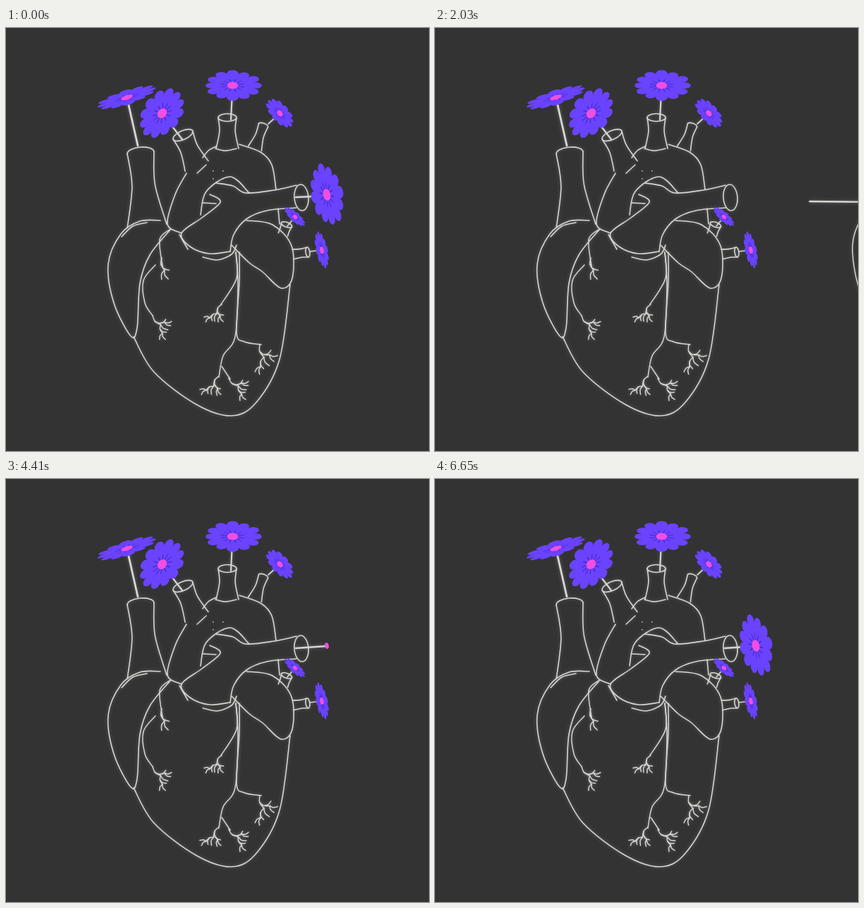
An HTML page with a canvas for the animation above (6.72 s loop, 600 by 600 pixels).

```html
<!DOCTYPE html>
<html lang="en">
<head>
<meta charset="utf-8">
<title>Heart in bloom</title>
<style>
html, body { margin: 0; width: 100%; height: 100%; overflow: hidden; background: #333; }
canvas { display: block; width: 600px; height: 600px; }
</style>
</head>
<body>
<canvas id="stage" width="600" height="600"></canvas>
<script>
const LOOP = 6720, STEP = 70;
const BG = '#333333', INK = '#d6d6d3', PETAL = '#6a43ff', VEIN = '#3d22b4', PINK = '#f04fe0';
const ctx = document.getElementById('stage').getContext('2d');

const clamp = v => Math.max(0, Math.min(1, v));
const mix = (a, b, k) => a + (b - a) * k;
const rad = deg => deg * Math.PI / 180;
const noise = n => { const v = Math.sin(n * 12.9898) * 43758.5453; return v - Math.floor(v); };
const parse = s => s.trim().split(/\s+/).map(p => p.split(',').map(Number));

// Smooth curve through a few key points
function trace(g, pts, joined) {
  if (!joined) g.moveTo(...pts[0]);
  for (let i = 0; i < pts.length - 1; i++) {
    const a = pts[i - 1] || pts[i], b = pts[i], c = pts[i + 1], d = pts[i + 2] || c;
    g.bezierCurveTo(
      b[0] + (c[0] - a[0]) / 6, b[1] + (c[1] - a[1]) / 6,
      c[0] - (d[0] - b[0]) / 6, c[1] - (d[1] - b[1]) / 6, c[0], c[1]);
  }
}

function ink(g, width, draw) {
  g.save();
  g.strokeStyle = INK;
  g.lineWidth = width;
  g.lineCap = g.lineJoin = 'round';
  g.shadowColor = 'rgba(255,255,255,.3)';
  g.shadowBlur = 5;
  g.beginPath();
  draw();
  g.stroke();
  g.restore();
}
const curve = (g, pts, width = 1.6) => ink(g, width, () => trace(g, pts));
const curves = (g, text, width) =>
  text.trim().split('\n').forEach(row => curve(g, parse(row), width));

// A vessel: mouth of radius r, walls that narrow and flare out to the base
function tube(g, x, y, deg, r, len, base, open = true) {
  const mouth = r * 0.42;
  g.save();
  g.translate(x, y);
  g.rotate(rad(deg - 90));
  ink(g, 1.6, () => g.ellipse(0, 0, r, mouth, 0, Math.PI, open ? 3 * Math.PI : 2 * Math.PI));
  for (const s of [-1, 1]) curve(g, [[s * r, 0], [s * r * 0.86, len * 0.45], [s * base, len]]);
  g.restore();
}

// A vein that keeps splitting in two
function fork(g, x, y, deg, size, depth) {
  const a = rad(deg), bend = rad(deg + 20);
  const mid = [x + size * 0.5 * Math.cos(bend), y + size * 0.5 * Math.sin(bend)];
  const end = [x + size * Math.cos(a), y + size * Math.sin(a)];
  curve(g, [[x, y], mid, end], 1.5);
  if (!depth) return;
  const spread = 24 + 14 * noise(x + y);
  fork(g, ...mid, deg - spread * 1.4, size * 0.8, depth - 1);
  fork(g, ...end, deg + spread, size * 0.75, depth - 1);
  fork(g, ...end, deg - spread * 0.4, size * 0.75, 0);
}

function flower(g, x, y, deg, major, minor, grow = 1, core = 1) {
  const n = 12;
  g.save();
  g.translate(x, y);
  g.rotate(rad(deg));
  g.save();
  g.scale(major, minor);
  g.fillStyle = PETAL;
  for (let i = 0; i < n && grow > 0; i++) {
    const a = i / n * 2 * Math.PI;
    const full = 0.94 + 0.1 * noise(i + x);
    const len = Math.min(full, grow * (1.12 + 0.35 * Math.max(0, Math.cos(a)) ** 4));
    const w = len * 0.2;
    g.save();
    g.rotate(a);
    g.beginPath();
    g.moveTo(0, 0);
    g.bezierCurveTo(len * 0.35, -w * 0.7, len * 0.55, -w, len * 0.8, -w);
    g.bezierCurveTo(len * 1.06, -w * 0.8, len * 1.06, w * 0.8, len * 0.8, w);
    g.bezierCurveTo(len * 0.55, w, len * 0.35, w * 0.7, 0, 0);
    g.fill();
    g.restore();
  }
  g.strokeStyle = VEIN;
  g.lineWidth = 0.03;
  for (let i = 0; i < n && grow > 0.3; i++) {
    const a = (i + 0.5) / n * 2 * Math.PI, r = grow * 0.42;
    g.beginPath();
    g.moveTo(0, 0);
    g.lineTo(r * Math.cos(a), r * Math.sin(a));
    g.stroke();
  }
  g.restore();
  g.fillStyle = PINK;
  g.beginPath();
  g.ellipse(0, 0, major * 0.19 * core, (minor * 0.18 + 1.2) * core, 0, 0, 7);
  g.fill();
  g.restore();
}

function planted(g, x, y, deg, major, minor, footX, footY, width) {
  curve(g, [[x, y], [footX, footY]], width);
  flower(g, x, y, deg, major, minor);
}

function drawHeart(g) {
  // Vessels
  tube(g, 191, 177, 85, 19, 104, 28, false);
  tube(g, 251, 152, 66, 15, 48, 18);
  tube(g, 314, 127, 90, 13, 44, 16);
  tube(g, 365, 138, 110, 7, 35, 10, false);
  tube(g, 398, 279, 110, 8, 15, 7);
  tube(g, 428, 318, 172, 7, 21, 7);
  ink(g, 1.6, () => g.ellipse(419, 240.5, 10, 18.5, -0.08, 0, 7));
  // Chambers, aorta, trunk, body
  curves(g, `
219,273 190,274 163,292 145,335 153,390 177,437 186,425 190,362 204,322 234,285
164,296 180,281 200,276
256,206 240,236 229,278 249,291
271,206 284,194
279,184 287,174 298,168
297,171 311,174 327,171
331,165 361,176 377,194 383,229
276,265 284,232 318,211 345,234
298,220 322,224 340,234 380,230 412,223
279,248 298,249
289,236 304,247 278,269 249,291 261,310 288,320 318,317
412,255 370,259 341,271 323,293 318,317
246,293 258,314
279,325 300,329 320,321 327,308
341,273 378,279 405,309 406,355 390,369 364,346 345,333 320,308
386,256 388,278
181,438 210,488 270,534 320,550 355,531 388,470 403,364`);
  g.fillStyle = INK;
  for (let i = 0; i < 4; i++) g.fillRect(293 + 14 * (i % 2), 202 + 11 * (i >> 1), 1.5, 1.5);
  // Veins
  curves(g, `
232,286 218,300 222,338
212,336 195,358 197,390 208,408
326,318 327,355 305,392
331,318 331,360 327,432 338,445 362,449
326,318 329,365 325,438 308,465 302,495
306,480 318,498`, 1.5);
  fork(g, 221, 326, 78, 18, 1);
  fork(g, 208, 408, 48, 17, 2);
  fork(g, 306, 392, 118, 15, 2);
  fork(g, 360, 449, 72, 19, 2);
  fork(g, 302, 494, 118, 16, 2);
  fork(g, 316, 497, 38, 17, 2);
  // Flowers
  planted(g, 171.5, 98.5, -18, 45, 10.5, 187, 167, 2.8);
  planted(g, 221.5, 121, -50, 40, 27, 250, 158, 2.2);
  planted(g, 321.5, 81.5, 0, 41, 21.5, 319, 130, 2.2);
  planted(g, 388.5, 121, 48, 26, 13, 372, 136, 1.7);
  planted(g, 410, 268, 42, 19, 7, 399, 281, 1.7);
  planted(g, 448, 315, 78, 27, 8.5, 431, 317, 1.7);
}

// Rim of the hand, from the left side of the arm round to the right
const RIM = [
  '495,600 485,520 472,432 436,383 411,322 404,290 415,275',
  '415,275 434,296 446,345',
  '446,345 466,300 455,258 425,214',
  '425,214 440,217 455,208 496,222 531,263 556,335',
  '556,335 545,400 550,455 578,600'].map(parse);
const FINGERS = ['440,217 476,236 498,298', '455,214 510,251 537,320'].map(parse);

// Bends the reaching hand into the pinching one: arm upright, thumb closed
function bend([x, y], k) {
  const s = (y - 213) / 387;
  const thumb = 30 * Math.exp(-((x - 412) ** 2 + (y - 278) ** 2) / 1600);
  return [
    x + k * (49 - 53 * s * s + thumb),
    y + k * (22 * Math.cos(2 * Math.PI * s) * (1 - s) - thumb)];
}

function drawHand(pinch, dx, dy) {
  const posed = pts => pts.map(p => bend(p, pinch));
  const rim = RIM.map(posed);
  ctx.save();
  ctx.translate(dx, dy);
  ctx.fillStyle = BG;
  ctx.beginPath();
  rim.forEach((pts, i) => trace(ctx, pts, i > 0));
  ctx.fill();
  rim.forEach((pts, i) => curve(ctx, pts, i === 4 ? 3.2 : 1.5));
  FINGERS.forEach(pts => curve(ctx, posed(pts), 1.4));
  ctx.restore();
}

const heart = document.createElement('canvas');
heart.width = heart.height = 600;
drawHeart(heart.getContext('2d'));

function pluck(t) {
  const pull = Math.max(0, (t - 910) / 630) ** 2;
  const pinch = Math.min(1, pull);
  const x = 455 + 59 * pull;
  curve(ctx, [[Math.max(411, x - 110), 240 + 6 * pinch], [x, mix(238, 247, pinch)]], 2.4);
  flower(ctx, x, 236.5 + 7 * pinch, 78 - 3 * pinch, 44, 23);
  if (t < STEP) return;
  const away = (1 - clamp((t - 40) / 720)) ** 2;
  drawHand(pinch, 205 * away + 59 * (pull - pinch), 120 * away);
}

function regrow(t) {
  const rise = clamp((t - 2870) / 1330);
  if (rise > 0) curve(ctx, [[411, 240], [411 + 44 * rise, 240 - 3 * rise]], 2.3);
  const core = mix(0.3, 1, clamp((t - 4130) / 900));
  if (t >= 4130) flower(ctx, 455, 236.5, 78, 44, 23, clamp((t - 4270) / 2100), core);
}

function render(t) {
  ctx.fillStyle = BG;
  ctx.fillRect(0, 0, 600, 600);
  ctx.drawImage(heart, 0, 0);
  if (t < 2170) pluck(t);
  else regrow(t);
}

function tick(now) {
  render(Math.floor(now % LOOP / STEP) * STEP);
  requestAnimationFrame(tick);
}
requestAnimationFrame(tick);
</script>
</body>
</html>
```
